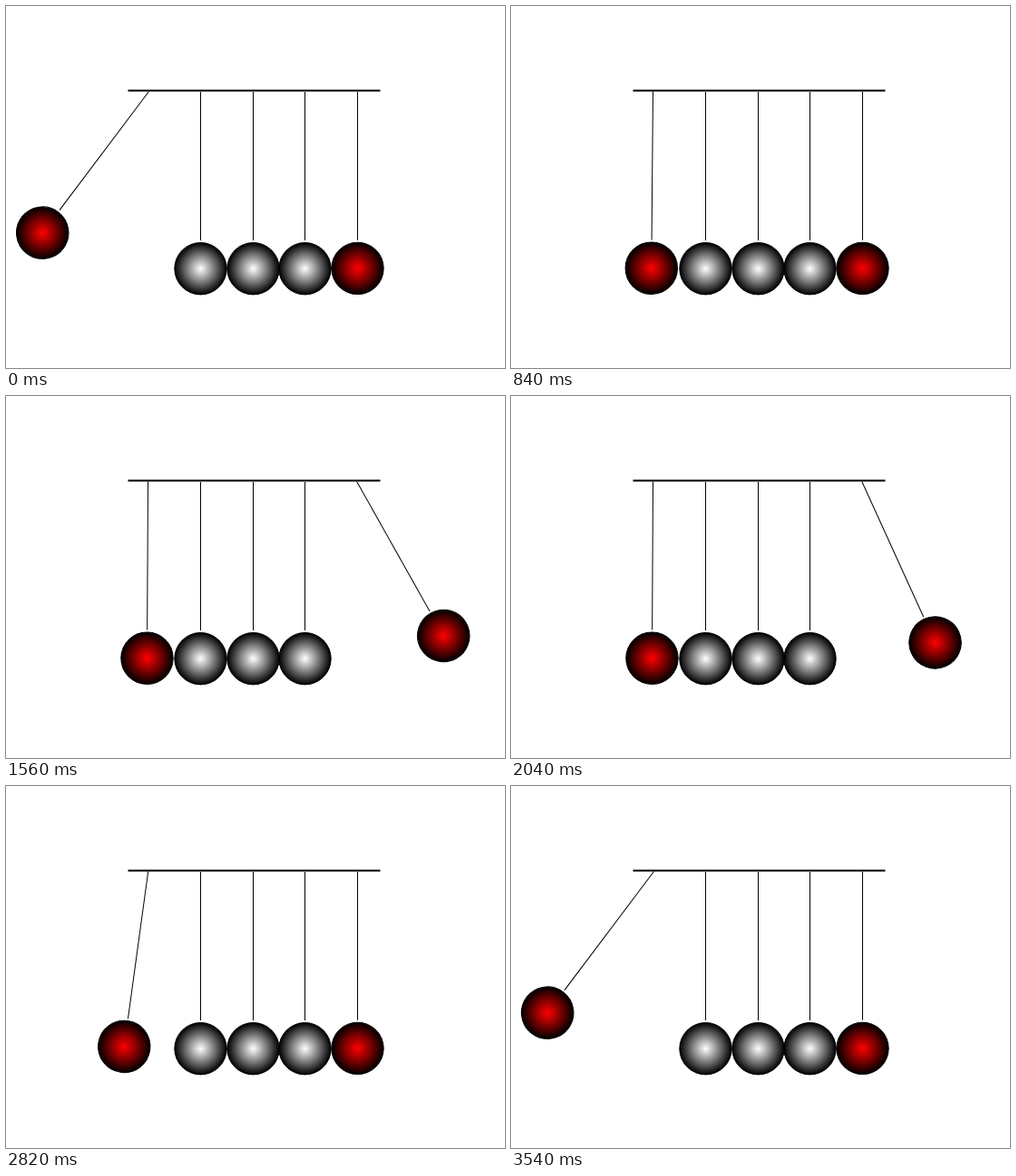
Write an HTML page that moves like this. It is 550x400 px and loops after 3.6 s.

```html
<!DOCTYPE html>
<html lang="en">
<head>
<meta charset="utf-8">
<title>Newton's cradle</title>
<style>
  @property --angle { syntax: "<number>"; inherits: false; initial-value: 0; }

  html, body { margin: 0; width: 100%; height: 100%; overflow: hidden; background: #fff; }
  svg { display: block; width: 550px; height: 400px; }
  .string { stroke: #000; stroke-width: 1; }
  .ball { stroke: #000; stroke-width: 1; }
  .steel { fill: url(#steel); }
  .red { fill: url(#red); }

  /* animating the angle, not the transform, keeps the strings sharp */
  .swing {
    transform-origin: 0 0;
    transform: translateX(calc(var(--angle) * .025px)) rotate(calc(var(--angle) * 1deg));
    animation: 3600ms infinite;
  }
  .left { animation-name: left; }
  .right { animation-name: right; }

  /* 60 ticks of 60 ms; each swing advances at a constant angle per tick */
  @keyframes left {
    0% { --angle: 36.9; animation-timing-function: steps(14); }
    23.333% { --angle: .5; animation-timing-function: step-end; }
    25% { --angle: .3; animation-timing-function: step-end; }
    73.333% { --angle: .5; animation-timing-function: steps(15); }
    98.333%, 100% { --angle: 36.9; }
  }
  @keyframes right {
    0% { --angle: 0; animation-timing-function: step-end; }
    23.333% { --angle: 0; animation-timing-function: steps(15); }
    48.333% { --angle: -36.6; animation-timing-function: steps(15); }
    73.333%, 100% { --angle: 0; }
  }
</style>
</head>
<body>
<svg viewBox="0 0 550 400">
  <defs>
    <radialGradient id="steel">
      <stop offset="0" stop-color="#fff"/>
      <stop offset="1" stop-color="#000"/>
    </radialGradient>
    <radialGradient id="red">
      <stop offset="0" stop-color="#f00"/>
      <stop offset="1" stop-color="#000"/>
    </radialGradient>
    <g id="pendulum">
      <line class="string" y2="164"/>
      <circle class="ball" cy="195.2" r="28.7"/>
    </g>
  </defs>

  <rect x="134.5" y="92.5" width="278" height="2"/>

  <g class="steel">
    <use href="#pendulum" x="214.5" y="95"/>
    <use href="#pendulum" x="272.5" y="95"/>
    <use href="#pendulum" x="329.5" y="95"/>
  </g>
  <g class="red">
    <g transform="translate(156.5 94.5)"><g class="swing left"><use href="#pendulum"/></g></g>
    <g transform="translate(387.5 94.7)"><g class="swing right"><use href="#pendulum"/></g></g>
  </g>
</svg>
</body>
</html>
```
